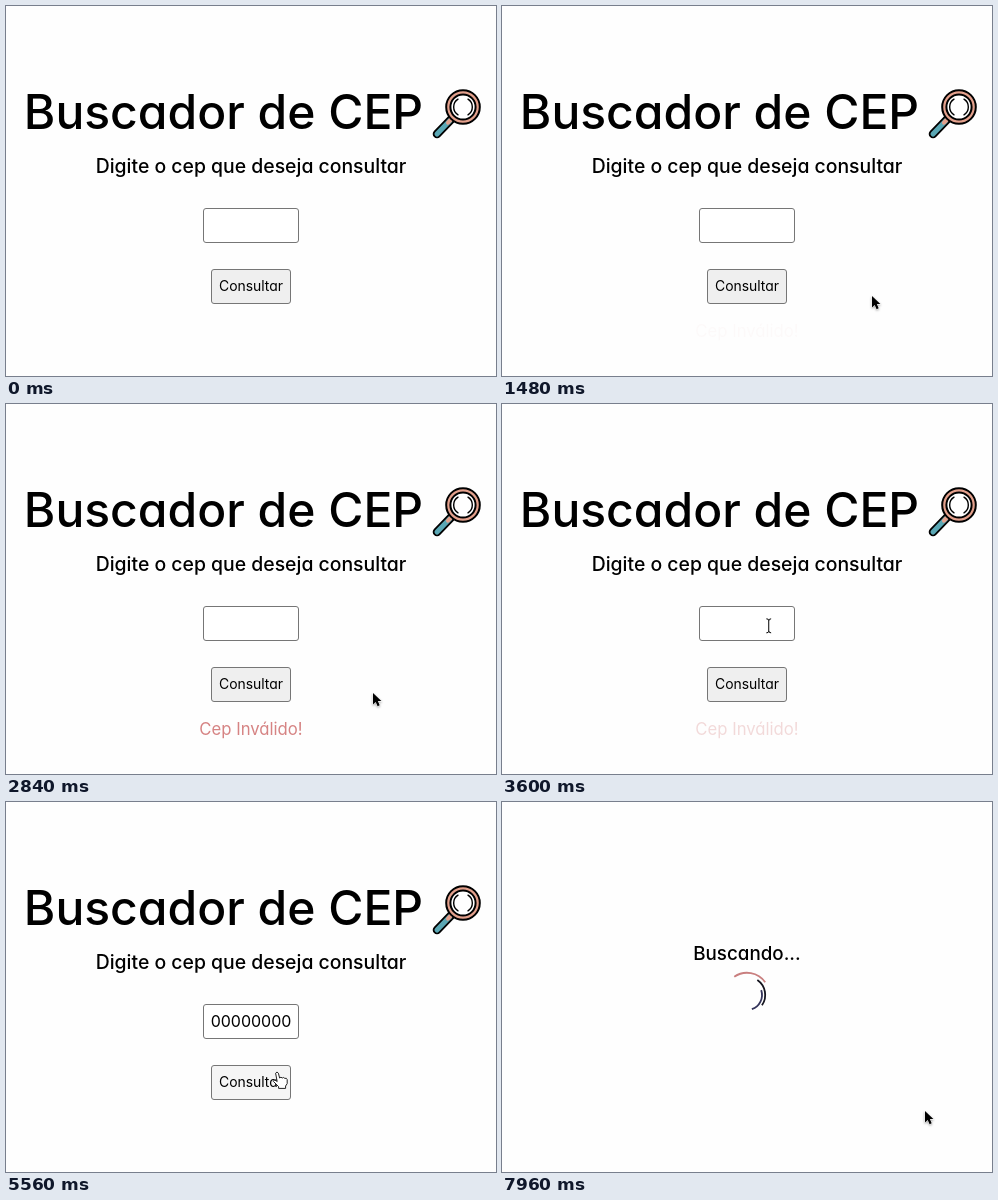
Recreate the animation shown at these times as an HTML page. Size 490 px wide and 370 px high, loop 8 s.

```html
<!DOCTYPE html>
<html lang="pt-BR">
<head>
<meta charset="utf-8">
<title>Buscador de CEP</title>
<style>
  html, body { margin: 0; width: 100%; height: 100%; overflow: hidden; background: #fefefe; }
  svg { display: block; width: 490px; height: 370px; }
  text {
    font-family: Inter, "Noto Sans", sans-serif;
    font-feature-settings: "cv11";
    font-optical-sizing: none;
    text-anchor: middle;
  }
  .medium { font-weight: 500; }
  .line { fill: none; stroke: #000; stroke-linecap: round; }
</style>
</head>
<body>
<svg viewBox="0 0 490 370">
  <rect width="490" height="370" fill="#fefefe"/>

  <g id="form">
    <text class="medium" x="217.5" y="123" font-size="48">Buscador de CEP</text>

    <g id="glass">
      <path class="line" d="M445 113.5L431 128" stroke-width="8.6"/>
      <path class="line" d="M444 114.5L431 128" stroke-width="5" style="stroke:#5aa7b4"/>
      <path class="line" d="M447 111.5L442 116.7" stroke-width="4" style="stroke:#e3a08c"/>
      <circle cx="457" cy="101" r="16.8" fill="#e3a08c" stroke="#000" stroke-width="2"/>
      <circle cx="457" cy="101" r="12.6" fill="#fff" stroke="#000" stroke-width="2"/>
      <path class="line" d="M452 93.2A9.2 9.2 0 0 0 452 108.8M462 93.2A9.2 9.2 0 0 1 462 108.8" stroke-width="1.4"/>
    </g>

    <text class="medium" x="245" y="167" font-size="19.4">Digite o cep que deseja consultar</text>

    <rect x="197.5" y="202.5" width="95" height="34" rx="2.5" fill="#fff" stroke="#767676"/>
    <text id="value" x="245" y="225" font-size="16"></text>
    <path id="caret" d="M0 208V230.5" stroke="#000" stroke-width="1.2"/>

    <rect id="button" x="205.5" y="263.5" width="79" height="34" rx="2.5" stroke="#767676"/>
    <text x="245" y="285.3" font-size="13.9">Consultar</text>

    <text id="error" x="245" y="331" font-size="16.7" fill="#d68383">Cep Inválido!</text>
  </g>

  <g id="loading">
    <text class="medium" x="245" y="158" font-size="18.8">Buscando...</text>
    <g id="spinner" transform="translate(245 193)" fill="none" stroke-width="1.8"></g>
  </g>

  <g id="cursor">
    <path id="arrow" d="M0 0V11.4L2.7 8.9L4.6 13.2L6.7 12.3L4.9 8.1H8.4Z" fill="#000" stroke="#fff" stroke-width="1" paint-order="stroke"
      style="filter:drop-shadow(0 1px 1px rgba(0,0,0,.35))"/>
    <path id="hand" d="M-1.4 1.2Q0 -1.2 1.4 1.2L2.6 6Q4 4.4 5.2 6Q6.8 4.8 7.8 6.4Q9.6 5.6 10.2 7.6V11.6L8.6 14V16.4H1.6V14.6L-3.6 9.4Q-3.4 7.2 -1 8.6L.2 9.6Z"
      fill="#fff" stroke="#222" stroke-width="1"/>
    <path id="beam" class="line" d="M-2 -7Q0 -7 0 -5.5V5.5Q0 7 -2 7M2 -7Q0 -7 0 -5.5M0 5.5Q0 7 2 7" stroke-width="1"/>
  </g>
</svg>

<script>
const LOOP = 8000;
const FOCUS = 3700, FIRST_KEY = 4060, KEY_GAP = 140, DIGITS = 8;
const CARET_OFF = 5540, SEARCH = 5680, SPIN_AT = 6400;

// time, x, y
const track = [
  [0, 350, 386], [440, 306, 318], [800, 264, 281], [1120, 264, 281],
  [1440, 370, 290], [2400, 370, 290], [2840, 367, 289], [3240, 367, 289],
  [3640, 264, 220], [3960, 264, 220], [4320, 320, 249], [4560, 320, 249],
  [4840, 318, 270], [4960, 316, 272], [5360, 271, 270], [5620, 271, 270],
  [5760, 306, 290], [6080, 412, 312], [6400, 419, 310], [7300, 419, 310],
  [7800, 423, 309], [8000, 423, 309]
];

// radius, colour, period, phase at SPIN_AT
const rings = [
  [22.2, "#c97f7f", 1751, .244],
  [18.2, "#15151f", 1656, .403],
  [15, "#33335a", 1735, .508]
];

const $ = id => document.getElementById(id);
const clamp = v => Math.min(1, Math.max(0, v));
const smooth = v => v * v * (3 - 2 * v);
const ramp = (t, from, to) => smooth(clamp((t - from) / (to - from)));
const show = (el, on) => { el.style.display = on ? "" : "none"; };

// cubic-bezier(.5, 0, .5, 1)
function ease(x) {
  let lo = 0, hi = 1;
  for (let i = 0; i < 16; i++) {
    const s = (lo + hi) / 2;
    if (1.5 * s * (1 - s) + s ** 3 < x) lo = s; else hi = s;
  }
  return smooth(lo);
}

const arcs = rings.map(([r, colour]) => {
  const arc = document.createElementNS("http://www.w3.org/2000/svg", "path");
  const d = r * Math.SQRT1_2;
  arc.setAttribute("d", `M${-d} ${-d}A${r} ${r} 0 0 1 ${d} ${-d}`);
  arc.setAttribute("stroke", colour);
  return $("spinner").appendChild(arc);
});

function pointer(t) {
  let i = 1;
  while (i < track.length - 1 && track[i][0] < t) i++;
  const [t0, x0, y0] = track[i - 1], [t1, x1, y1] = track[i];
  const k = ramp(t, t0, t1);
  return [x0 + (x1 - x0) * k, y0 + (y1 - y0) * k];
}

function draw(t) {
  const searching = t >= SEARCH;
  show($("form"), !searching);
  show($("loading"), searching);

  const [x, y] = pointer(t);
  const overButton = !searching && x > 205 && x < 285 && y > 263 && y < 298;
  const overInput = !searching && x > 197 && x < 293 && y > 202 && y < 237;
  $("cursor").setAttribute("transform", `translate(${x} ${y})`);
  show($("hand"), overButton);
  show($("beam"), overInput);
  show($("arrow"), !overButton && !overInput);

  const typed = Math.min(DIGITS, Math.max(0, Math.floor((t - FIRST_KEY) / KEY_GAP) + 1));
  $("value").textContent = "0".repeat(typed);
  $("caret").setAttribute("transform", `translate(${245.5 + typed * 5} 0)`);
  show($("caret"), t >= FOCUS && t < CARET_OFF);

  $("button").setAttribute("fill", overButton ? "#f5f5f5" : "#efefef");
  $("error").setAttribute("opacity", ramp(t, 1300, 2900) * (1 - ramp(t, 3240, 3800)));

  rings.forEach(([, , period, phase], i) => {
    const turns = (t - SPIN_AT) / period + phase + 5;
    arcs[i].setAttribute("transform", `rotate(${360 * ease(turns % 1)})`);
  });
}

const start = performance.now();
function tick() {
  draw((performance.now() - start) % LOOP);
  requestAnimationFrame(tick);
}
draw(0);
requestAnimationFrame(tick);
</script>
</body>
</html>
```
